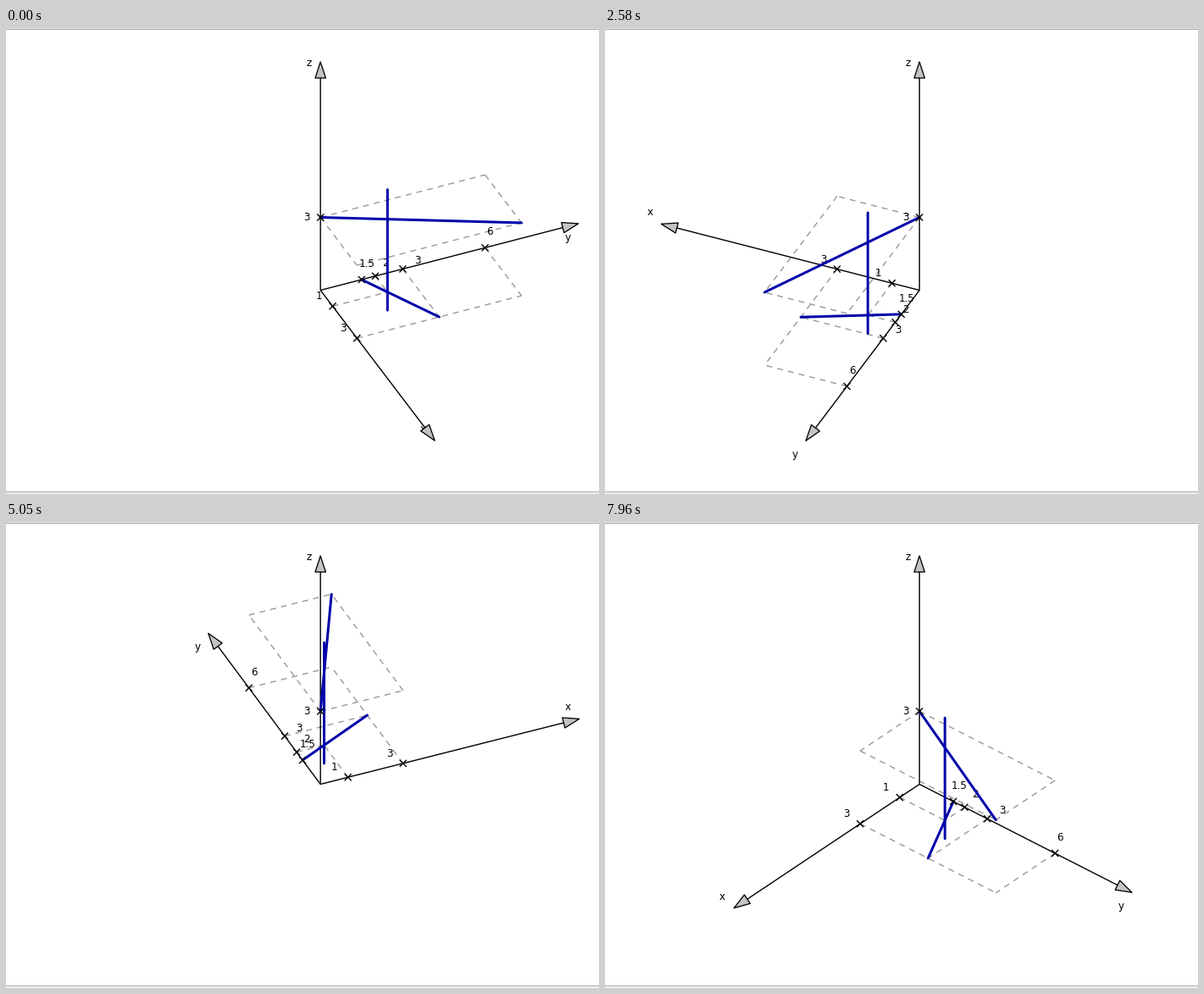
A matplotlib script for the animation above (8000 ms loop, 700x550 px).

```python
import numpy as np
import matplotlib.pyplot as plt
from matplotlib.animation import FuncAnimation
from matplotlib.collections import LineCollection, PolyCollection

W, H, DPI = 700, 550, 100
PX = 72 / DPI                       # one pixel in points
LOOP, TICK = 8000, 20               # ms
ORIGIN = np.array([371.2, 309.5])
RX, RY, RZ = 35.42, 20.65, 28.67    # pixels per unit: across, in depth, upwards
START, TURN = 66.1, 2.415           # first angle and degrees per step

# Key times of the slightly uneven turning and the steps done by then
KEY_TIMES = [0, 1060, 5050, 6330, LOOP]
KEY_STEPS = [0, 24, 112, 139, 177]

TIPS = 9.4 * np.eye(3)
BARS = [
    [(0, 0, 3), (3, 6, 3)],
    [(0, 1.5, 0), (3, 3, 0)],
    [(1, 2, -0.75), (1, 2, 4.22)],
]

# Dashed guides run from the axes, or their lifted copies, to each corner
GUIDES = [[(0, 3, 0), (3, 3, 0)]]
for x, y, z in [(3, 6, 0), (1, 2, 0), (3, 6, 3)]:
    for foot in [(x, 0, z), (0, y, z)]:
        GUIDES.append([foot, (x, y, z)])
        if z:
            GUIDES.append([(0, 0, z), foot])

# Labels: text, point in space, shift of the text centre in pixels
TICKS = [("3", (0, 0, 3), (-16, 0))]
TICKS += [(str(x), (x, 0, 0), (-16, -12)) for x in (1, 3)]
for y, lean in zip((1.5, 2, 3, 6), np.radians((71, 52, 30, 73))):
    TICKS.append((str(y), (0, y, 0), (20 * np.cos(lean), -20 * np.sin(lean))))
NAMES = list(zip("xyz", TIPS, [(-13.5, -14), (-12.5, 16), (-14, 0.5)]))
LABELS = TICKS + NAMES

plt.rcParams["font.family"] = "DejaVu Sans"
plt.rcParams["lines.scale_dashes"] = False

fig = plt.figure(figsize=(W / DPI, H / DPI), dpi=DPI, facecolor="white")
ax = fig.add_axes([0, 0, 1, 1])
ax.set_xlim(0, W)
ax.set_ylim(H, 0)
ax.axis("off")


def strip(top, height, color):
    ax.add_patch(plt.Rectangle((0, top), W, height, color=color, lw=0))


def lines(color, width, z, **kw):
    item = LineCollection([], colors=color, linewidths=width * PX, zorder=z,
                          snap=False, **kw)
    return ax.add_collection(item, autolim=False)


strip(0, 1, "#f0f0f0")
strip(1, 1, "#a0a0a0")
strip(547, 1, "#a8a8a8")
strip(548, 2, "#f0f0f0")

guides = lines("#999999", 1.4, 2, linestyles=[(0, (7 * PX, 6 * PX))])
shafts = lines("black", 1.4, 4)
heads = PolyCollection([], facecolors="#c4c4c4", edgecolors="black", snap=False,
                       linewidths=1.3 * PX, joinstyle="round", zorder=5)
ax.add_collection(heads, autolim=False)
bars = lines("#0000aa", 3, 6, capstyle="round")
crosses = lines("black", 1.4, 7)
labels = [ax.text(0, 0, text, fontsize=12 * PX, ha="center", va="baseline", zorder=3)
          for text, _, _ in LABELS]


def project(point, angle):
    x, y, z = point
    c, s = np.cos(angle), np.sin(angle)
    return ORIGIN + [RX * (x * c + y * s), RY * (x * s - y * c) - RZ * z]


def arrow_head(tip, length=19, half=6.2):
    d = (tip - ORIGIN) / np.hypot(*(tip - ORIGIN))
    side = half * np.array([-d[1], d[0]])
    base = tip - length * d
    return [tip, base + side, base - side]


def cross(p, r=4):
    return [[p - r, p + r], [p + [-r, r], p + [r, -r]]]


def update(n):
    step = int(np.interp((n + 0.5) * TICK, KEY_TIMES, KEY_STEPS))
    angle = np.radians(START + TURN * step)

    def flat(pairs):
        return [[project(p, angle) for p in pair] for pair in pairs]

    tips = [project(p, angle) for p in TIPS]
    guides.set_segments(flat(GUIDES))
    bars.set_segments(flat(BARS))
    shafts.set_segments([[ORIGIN, tip] for tip in tips])
    heads.set_verts([arrow_head(tip) for tip in tips])
    crosses.set_segments([s for _, p, _ in TICKS for s in cross(project(p, angle))])
    for label, (_, p, shift) in zip(labels, LABELS):
        label.set_position(project(p, angle) + shift + [0, 4])
    return [guides, shafts, heads, bars, crosses, *labels]


anim = FuncAnimation(fig, update, frames=LOOP // TICK, interval=TICK,
                     repeat=True, repeat_delay=0)
plt.show()
```
